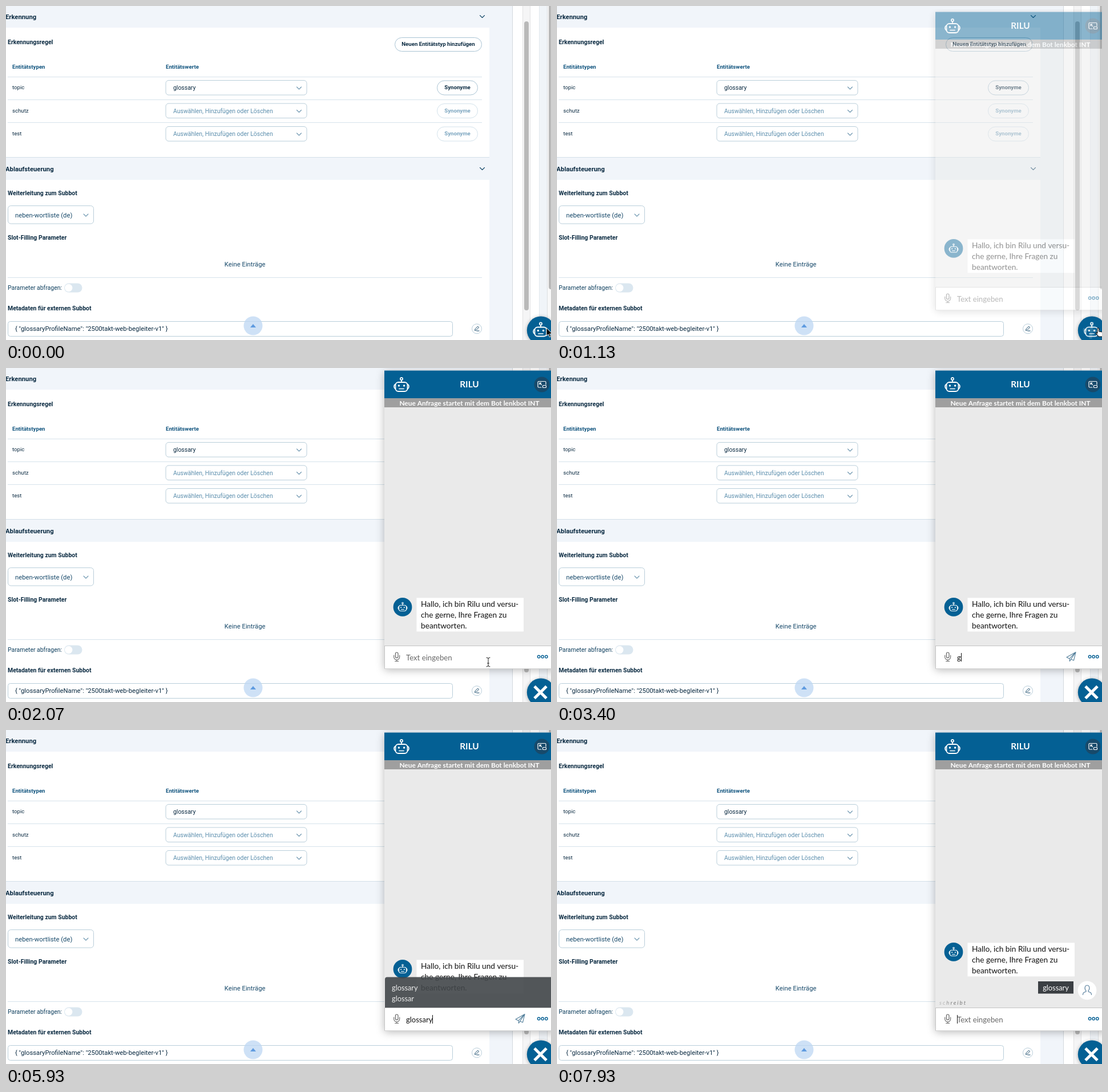
An HTML page with a canvas for the animation above (8000 ms loop, 955 by 586 pixels).

```html
<!DOCTYPE html>
<html lang="de">
<head>
<meta charset="utf-8">
<title>Chat</title>
<style>
html, body { margin: 0; width: 100%; height: 100%; overflow: hidden; background: #fff; }
canvas { display: block; }
</style>
</head>
<body>
<canvas id="stage" width="955" height="586"></canvas>
<script>
const W = 955, H = 586, LOOP = 8000;
const UI = 'Roboto, sans-serif', CHAT = 'Lato, sans-serif';
const NAVY = '#0b2b42', INK = '#17496a', BLUE = '#046094', EDGE = '#b9ceda', RULE = '#d6e3eb', BAR = '#f1f5fa';
const view = document.getElementById('stage').getContext('2d');
const layer = document.createElement('canvas');
layer.width = W;
layer.height = H;
const chatCtx = layer.getContext('2d');
let c = view;

const clamp = v => Math.max(0, Math.min(1, v));
const ease = v => v * v * (3 - 2 * v);

function box(x, y, w, h, fill) {
  c.fillStyle = fill;
  c.fillRect(x, y, w, h);
}

function round(x, y, w, h, r, fill, stroke, width = 1) {
  c.beginPath();
  c.roundRect(x, y, w, h, r);
  paint(fill, stroke, width);
}

function disc(x, y, r, fill, stroke, width = 1) {
  c.beginPath();
  c.arc(x, y, r, 0, 7);
  paint(fill, stroke, width);
}

function paint(fill, stroke, width) {
  if (fill) { c.fillStyle = fill; c.fill(); }
  if (stroke) { c.strokeStyle = stroke; c.lineWidth = width; c.stroke(); }
}

function path(d, fill, stroke, width = 1, x = 0, y = 0) {
  c.save();
  c.translate(x, y);
  c.lineCap = c.lineJoin = 'round';
  const p = new Path2D(d);
  if (fill) { c.fillStyle = fill; c.fill(p); }
  if (stroke) { c.strokeStyle = stroke; c.lineWidth = width; c.stroke(p); }
  c.restore();
}

// y is the middle of the capitals
function text(s, x, y, size, color, weight = 400, font = UI, align = 'left') {
  c.font = `${weight} ${size}px ${font}`;
  c.textAlign = align;
  c.fillStyle = color;
  c.fillText(s, x, y + size * 0.355);
}

const chevron = (x, y, color = '#6f97b0') => path('M-4 -2L0 2L4 -2', null, color, 1.1, x, y);

function select(y, label, color) {
  round(280, y - 13, 247, 25.6, 5, '#fff', EDGE);
  text(label, 293, y, 10.46, color);
  chevron(513.5, y + 0.5);
}

function pill(x, y, w, h, label, color, edge) {
  round(x, y, w, h, h / 2, '#fff', edge);
  text(label, x + w / 2, y + h / 2 - 0.5, 9.66, color, 700, UI, 'center');
}

function section(y, label) {
  box(0, y, 847, 39, BAR);
  text(label, -1, y + 19.5, 11.27, NAVY, 700);
  chevron(834.5, y + 19.5, INK);
}

function robot(x, y, s, color) {
  c.save();
  c.translate(x, y);
  c.scale(s, s);
  c.strokeStyle = color;
  disc(0, -11, 2.1, null, color, 1.7);
  path('M0 -8.8V-5M-11 -1.5Q-13 0 -13 2.5T-11 6.5M11 -1.5Q13 0 13 2.5T11 6.5M-4 6.5H4', null, color, 1.7);
  round(-10.5, -5, 21, 16, 5, null, color, 1.8);
  disc(-4.6, 1, 1.7, color);
  disc(4.6, 1, 1.7, color);
  c.restore();
}

function page() {
  box(0, 0, W, H, '#fff');
  box(847, 0, 40, H, BAR);
  section(-1, 'Erkennung');
  text('Erkennungsregel', 3, 63.5, 10.46, NAVY, 700);
  pill(681.5, 55.5, 152, 24, 'Neuen Entitätstyp hinzufügen', NAVY, '#a9c3d3');
  text('Entitätstypen', 11, 107, 9.66, '#12557f', 700);
  text('Entitätswerte', 280, 107, 9.66, '#12557f', 700);
  ['topic', 'schutz', 'test'].forEach((name, i) => {
    const y = 143.5 + i * 40.5;
    box(3, 124 + i * 40.3 | 0, 831, 1, RULE);
    text(name, 11, y - 0.5, 9.66, NAVY);
    select(y, i ? 'Auswählen, Hinzufügen oder Löschen' : 'glossary', i ? '#5b8ead' : NAVY);
    pill(755.5, y - 12.5, 71, 25, 'Synonyme', i ? '#7ba5bf' : NAVY, i ? '#d3e2eb' : '#a9c3d3');
  });

  section(266, 'Ablaufsteuerung');
  box(0, 265, 847, 1, '#d3e0e9');
  text('Weiterleitung zum Subbot', 3, 328, 10.46, NAVY, 700);
  round(3.5, 350.5, 150, 31.5, 5, '#fff', EDGE);
  text('neben-wortliste (de)', 16, 366.5, 11.27, INK);
  chevron(140, 367);
  text('Slot-Filling Parameter', 3, 406, 10.46, NAVY, 700);
  text('Keine Einträge', 418.7, 452.5, 11.27, INK, 400, UI, 'center');
  box(3, 476, 831, 1, RULE);
  text('Parameter abfragen:', 3, 494, 10.46, '#10405f');
  round(102, 486.5, 31.5, 16, 8, '#dbe7f0');
  disc(109.7, 494.5, 6.7, '#fff');
  text('Metadaten für externen Subbot', 3, 530, 10.46, NAVY, 700);
  round(3.5, 553.5, 779, 26, 4, '#fff', EDGE);
  text('{ "glossaryProfileName": "2500takt-web-begleiter-v1" }', 16, 566.3, 11.27, NAVY);
  disc(825, 566.3, 8.5, '#fff', EDGE);
  path('M-3 3L-2.4 0.6L2 -4L4 -2L-.6 2.4ZM0 4H4.5', null, INK, 1, 824.6, 566);
  disc(433, 561, 16.5, 'rgba(190,215,243,.75)');
  path('M-5 3L0 -3L5 3Z', '#5f9be0', null, 1, 433, 561);

  // window edges and scroll bars
  box(887, 0, 1, H, '#d2d8de');
  box(905, 0, 13, H, '#f5f5f6');
  box(905, 0, 1, H, '#e3e3e4');
  box(918, 0, 1, H, '#e3e3e4');
  round(908, 27, 8, 507, 4, '#b9b9b9');
  box(934, 0, 14, H, '#f0f4f8');
  box(934, 0, 1, H, '#e3e9ee');
  box(948, 0, 1, H, '#dcdfe2');
  box(949, 0, 6, H, '#f8f8f8');
  round(951, -6, 8, 503, 4, '#b9b9b9');
}

const keys = [[3400, 'g'], [3670, 'l'], [4000, 'o'], [4330, 's'], [4470, 's'], [4670, 'a'], [5400, 'r'], [5530, 'y']];
const typed = t => t >= 6070 ? '' : keys.filter(k => t >= k[0]).map(k => k[1]).join('');

const caretSpans = [[2140, 2670], [3200, 5200], [5400, 6070], [6600, 7130], [7660, LOOP]];
const caretOn = t => caretSpans.some(([a, b]) => t >= a && t < b);

function greeting(dy) {
  disc(695, 419.4 + dy, 16.4, BLUE);
  robot(695, 419.4 + dy, 0.62, '#fff');
  box(719.5, 403.3 + dy, 187.5, 59, '#fff');
  ['Hallo, ich bin Rilu und versu-', 'che gerne, Ihre Fragen zu', 'beantworten.'].forEach((line, i) =>
    text(line, 727, 414 + dy + i * 19, 13.7, '#111', 400, CHAT));
}

function answer() {
  box(843, 441, 62, 21.5, '#3b3f43');
  text('glossary', 874, 452, 12.8, '#fff', 400, CHAT, 'center');
  disc(929, 456.8, 16.4, '#fff');
  path('M-7.5 8C-7.5 4 -5 3.5 -2 2.6V1C-5 -2 -4.5 -8.5 0 -8.5S5 -2 2 1V2.6C5 3.5 7.5 4 7.5 8', null, '#5d83a0', 1.2, 929, 456.5);
}

// letters light up one after another and then dim again
function writing(t) {
  let x = 670;
  [...'schreibt'].forEach((ch, i) => {
    const age = t - 6600 - i * 120;
    const a = 0.6 * clamp(age / 300) - 0.32 * clamp((age - 950) / 250);
    text(ch, x, 479, 9.7, `rgba(50,50,50,${a})`, 'italic 400', CHAT);
    x += c.measureText(ch).width + 2;
  });
}

function entry(t) {
  const value = typed(t);
  box(663, 487, 292, 41, '#fff');
  box(663, 487, 292, 1, '#c4c4c4');
  box(663, 487, 1, 41, '#c4c4c4');
  box(663, 527, 292, 1, '#d2d2d2');
  round(682.4, 499, 4.6, 9.5, 2.3, null, '#666', 1.2);
  path('M-5 -2V1A5 5 0 0 0 5 1V-2M0 6V8.5M-3 8.5H3', null, '#666', 1.1, 684.7, 506);
  [933.6, 940.2, 946.8].forEach(x => disc(x, 506.5, 2.2, null, BLUE, 1.4));
  let end = 701;
  if (value) {
    text(value, 701, 508, 13, '#111', 400, CHAT);
    end += c.measureText(value).width;
    path('M8 -8L-8 1L-3 3.4L8 -8L4.5 6.5L-.5 4.6L-2.6 8L-3 3.4M-.5 4.6L8 -8', null, '#55809c', 1.1, 901, 506.5);
  } else {
    text('Text eingeben', 701, 508, 13.2, '#686868', 400, CHAT);
  }
  if (caretOn(t)) box(Math.round(end), 500, 1, 15, '#111');
}

function chat(t) {
  c.save();
  c.shadowColor = 'rgba(0,0,0,.28)';
  c.shadowBlur = 14;
  c.shadowOffsetY = 2;
  box(663, 4.5, 300, 523.5, '#eaeaea');
  c.restore();
  box(663, 4.5, 292, 48.5, BLUE);
  robot(693, 30, 1, '#fff');
  text('RILU', 812, 29, 15.4, '#fff', 700, CHAT, 'center');
  disc(939, 29, 13.5, '#174a6b');
  path('M-1 5H-5.5Q-7 5 -7 3.5V-4Q-7 -5.5 -5.5 -5.5H5.5Q7 -5.5 7 -4V0M-4 -2.8L-.5 .5M-4 0V-2.8H-1.2', null, '#fff', 1.2, 939, 29);
  round(940.5, 30.5, 6, 4, 1, null, '#fff', 1.2);
  box(663, 53, 292, 16, '#9f9f9f');
  text('Neue Anfrage startet mit dem Bot lenkbot INT', 812, 61.5, 11.9, '#fff', 700, CHAT, 'center');
  const sent = t >= 6130;
  greeting(sent ? -30 : 0);
  if (sent) answer();
  if (t >= 6600) writing(t);
  if (t >= 3800 && t < 6070) {
    round(664, 433.5, 296, 54, [4, 0, 0, 0], 'rgba(66,70,74,.9)');
    text('glossary', 676, 452, 12.8, '#ececec', 400, CHAT);
    text('glossar', 676, 471, 12.8, '#ececec', 400, CHAT);
  }
  entry(t);
}

function launcher(t) {
  const k = clamp((t - 1100) / 200);
  c.save();
  c.shadowColor = 'rgba(0,0,0,.3)';
  c.shadowBlur = 6;
  c.shadowOffsetY = 1;
  disc(937.3, 569, 24.5, BLUE);
  c.restore();
  c.save();
  c.globalAlpha = 1 - k;
  robot(937, 568.5, 1, '#fff');
  c.globalAlpha = k;
  c.translate(936.5, 569);
  c.rotate((k - 1) * 0.8);
  c.strokeStyle = '#fff';
  c.lineWidth = 5;
  c.lineCap = 'butt';
  c.beginPath();
  c.moveTo(-10.5, -10.5);
  c.lineTo(10.5, 10.5);
  c.moveTo(10.5, -10.5);
  c.lineTo(-10.5, 10.5);
  c.stroke();
  c.restore();
}

function pointer(t) {
  if (t >= 3400) return;
  const k = ease(clamp((t - 1570) / 500));
  const x = 947 - 102 * k, y = 565 - 49 * k;
  if (t >= 870 && y > 546) {
    path('M0 1.5Q0 0 1.3 0T2.6 1.5V6L8 7Q9.8 7.5 9.6 9.5L8.6 15H2L-2.2 9.6Q-3 8 -1.5 8L0 9.2Z', '#fff', '#111', 1.1, x, y);
  } else if (y > 528) {
    path('M0 0V14L3.3 11L5.4 15.8L7.8 14.8L5.7 10.2H10Z', '#000', '#fff', 1, x, y);
  } else {
    path('M-3 -8Q0 -8 0 -6Q0 -8 3 -8M0 -6V6M-3 8Q0 8 0 6Q0 8 3 8M-1.5 2H1.5', null, '#222', 1, x, y);
  }
}

function draw(t) {
  c = view;
  page();
  const open = clamp((t - 1015) / 250);
  if (open > 0) {
    c = chatCtx;
    c.clearRect(0, 0, W, H);
    chat(t);
    c = view;
    c.globalAlpha = open;
    c.drawImage(layer, 0, 11 * (1 - open));
    c.globalAlpha = 1;
  }
  launcher(t);
  pointer(t);
}

const start = performance.now();
function tick() {
  draw((performance.now() - start) % LOOP);
  requestAnimationFrame(tick);
}
tick();
</script>
</body>
</html>
```
